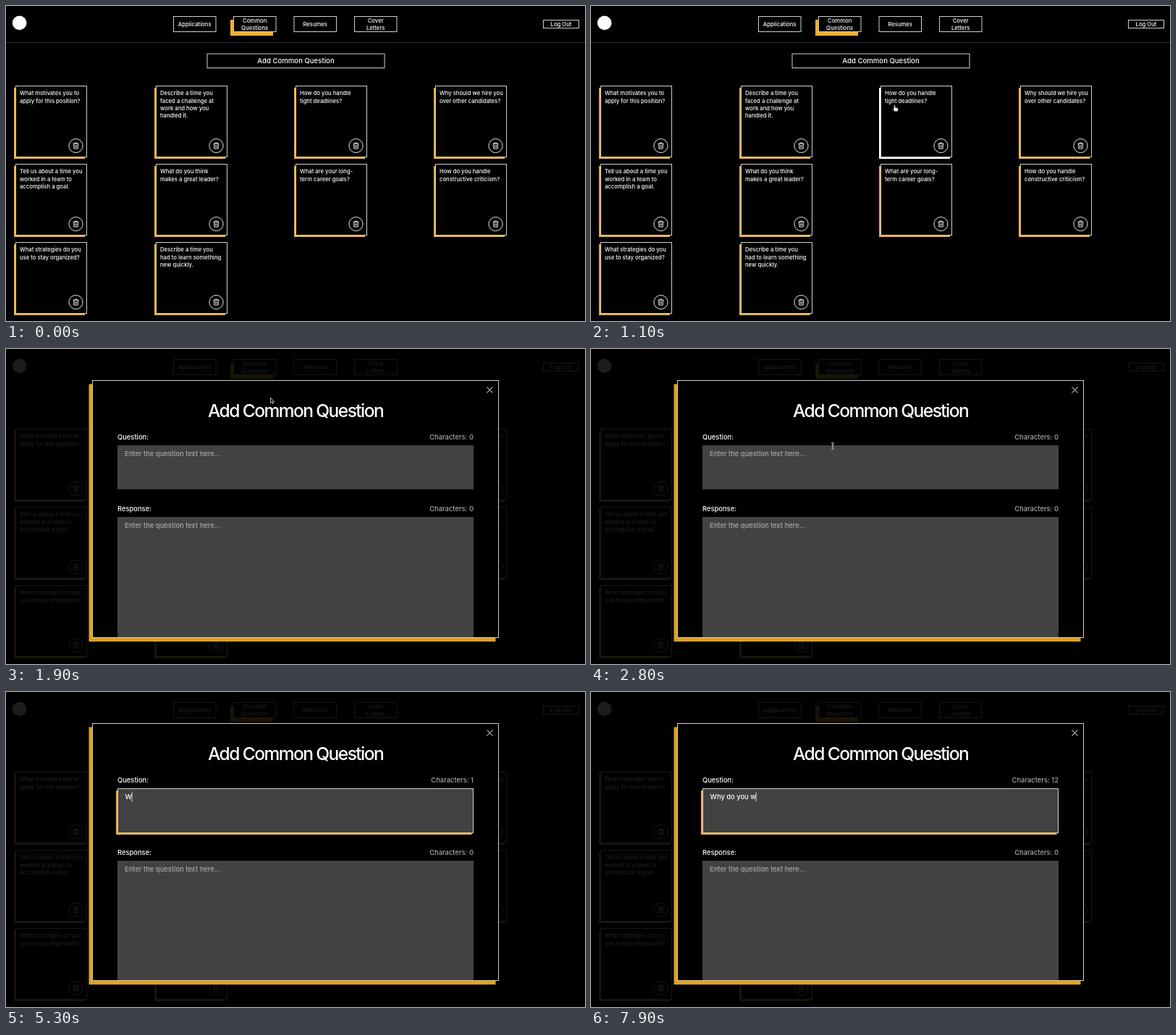
An HTML page that plays this animation: 800 px wide and 435 px high, repeating every 8000 ms.

```html
<!DOCTYPE html>
<html lang="en">
<head>
<meta charset="utf-8">
<title>Common Questions</title>
<style>
  html, body { margin: 0; width: 100%; height: 100%; overflow: hidden; background: #000; }
  svg { display: block; }
  text { font: 500 7.7px Inter, sans-serif; fill: #fff; white-space: pre; }
  .button { font-size: 9.6px; }
  .title { font-size: 24.6px; letter-spacing: -1.6px; }
  .label { font-size: 9.4px; }
  .hint { font-size: 9.4px; fill: #a9a9a9; }
  .mid { text-anchor: middle; }
  .end { text-anchor: end; }
  .line { fill: none; stroke: #fff; }
  .box { fill: #000; stroke: #d0d0d0; }
  .frame { fill: none; stroke: #d0d0d0; }
</style>
</head>
<body>
<svg id="stage" width="800" height="435" viewBox="0 0 800 435"></svg>
<script>
const ORANGE = '#f5ae29', GRAY = '#424242', LOOP = 8000;
const OPEN = 1900, FOCUS = 3600, BLINK = 500;
const CARD = 98, COLUMNS = [13.5, 207.5, 400.5, 593.5];
const BUTTON = { x: 278, y: 66, w: 245, h: 19.5 };

const questions = [
  'What motivates you to|apply for this position?',
  'Describe a time you|faced a challenge at|work and how you|handled it.',
  'How do you handle|tight deadlines?',
  'Why should we hire you|over other candidates?',
  'Tell us about a time you|worked in a team to|accomplish a goal.',
  'What do you think|makes a great leader?',
  'What are your long-|term career goals?',
  'How do you handle|constructive criticism?',
  'What strategies do you|use to stay organized?',
  'Describe a time you|had to learn something|new quickly.'
];
const cards = questions.map((text, i) => ({
  text, x: COLUMNS[i % 4], y: 110.5 + 108 * (i / 4 | 0), w: CARD, h: CARD
}));

const typed = 'Why do you w';
// [time, characters typed so far]
const keys = [[5300, 1], [6300, 2], [6800, 3], [6900, 4], [7100, 5], [7200, 6],
  [7300, 7], [7500, 8], [7600, 10], [7800, 11], [7900, 12]];
// [time, x, y] of the pointer tip
const route = [[100, 462, 424], [600, 442, 275], [1100, 419.5, 137], [1500, 384, 88],
  [1800, 365.5, 68], [2000, 365.5, 67], [2900, 330, 142], [3050, 330, 142], [3300, 322.3, 154]];

const rect = (x, y, w, h, attrs) =>
  `<rect x="${x}" y="${y}" width="${w}" height="${h}" ${attrs}/>`;
const text = (x, y, str, cls = '', id = '') =>
  `<text x="${x}" y="${y}" class="${cls}" id="${id}">${str}</text>`;
const lines = (x, y, str, cls) =>
  str.split('|').map((s, i) => text(x, y + i * 10.35, s, cls)).join('');

function navBox(x, label) {
  const y = label.includes('|') ? 22.8 : 28;
  return rect(x, 14.5, 58.5, 21, 'class="box"') + lines(x + 29.2, y, label, 'mid');
}

function card({ x, y, w, h, text: label }) {
  return rect(x - 2.5, y + 2.5, w, h, 'class="shadow"') +
    rect(x, y, w, h, 'class="box"') + lines(x + 5.5, y + 12.8, label) +
    `<g class="line" stroke-width=".9" transform="translate(${x + 83} ${y + 82.5})">
      <circle r="9.6"/>
      <path d="M-4-2.8H4M-1.5-2.8V-4H1.5V-2.8M-3-2.8L-2.7 4H2.7L3-2.8M-1-1V2.5M1-1V2.5"/></g>`;
}

const page = `
  <path d="M0 50.5H800" stroke="#2c2c2c"/>
  <circle cx="18.6" cy="23.4" r="9.8" fill="#fff"/>
  ${rect(310, 19, 59, 22, `fill="${ORANGE}"`)}
  ${navBox(231.5, 'Applications')}${navBox(314.5, 'Common|Questions')}
  ${navBox(398, 'Resumes')}${navBox(481.5, 'Cover|Letters')}
  ${rect(742.5, 19.5, 49, 11, 'class="box"')}${text(767, 27.8, 'Log Out', 'mid')}
  ${rect(273, 70.5, BUTTON.w, BUTTON.h, 'id="buttonShadow" fill="#fff"')}
  ${rect(BUTTON.x, BUTTON.y, BUTTON.w, BUTTON.h, 'class="box"')}
  ${text(400.5, 79.4, 'Add Common Question', 'button mid')}
  ${cards.map(card).join('')}`;

const placeholder = 'Enter the question text here...';
const modal = `<g id="modal">
  ${rect(0, 0, 800, 435, 'opacity=".89"')}
  ${rect(114.5, 48.5, 562, 355.5, 'fill="#dfa021"')}
  ${rect(119.5, 43.5, 561, 355, '')}
  <path class="line" d="M664.5 52.5l8 8m0-8l-8 8"/>
  ${text(400, 93.6, 'Add Common Question', 'title mid')}
  ${text(154, 125.2, 'Question:', 'label')}${text(646, 125.2, '', 'hint end', 'count')}
  ${rect(154.5, 133.5, 491.5, 61, `id="glow" fill="${ORANGE}"`)}
  ${rect(154, 133, 492, 60.7, `id="field" fill="${GRAY}"`)}
  ${text(164, 147.8, '', 'label', 'entry')}
  <path id="caret" stroke="#fff" stroke-width=".8"/>
  <g id="response">
    ${text(154, 223.8, 'Response:', 'label')}${text(646, 223.8, 'Characters: 0', 'hint end')}
    ${rect(154, 232, 492, 166, `fill="${GRAY}"`)}
    ${text(164, 246.6, placeholder, 'hint')}
  </g>
  ${rect(119.5, 43.5, 561, 355, 'class="frame"')}</g>`;

const beam = 'M-1.8-3.8Q0-3.8 0-2.8V2.8Q0 3.8-1.8 3.8M1.8-3.8Q0-3.8 0-2.8M0 2.8Q0 3.8 1.8 3.8';
const pointers = `<g id="pointer">
  <path id="hand" fill="#fff" stroke="#000" stroke-width=".5"
    d="M-.9.8a.9.9 0 0 1 1.8 0V3.2L4 3.8Q5 4 5 5L4.4 8.8H.2L-2.3 5.6Q-2.5 4.2-.9 5Z"/>
  <path id="arrow" stroke="#fff" stroke-width=".7" d="M0 0V7L1.6 5.6 2.7 8 3.8 7.5 2.8 5.2H5Z"/>
  <g id="ibeam" fill="none"><path stroke="#ddd" stroke-width="1.8" d="${beam}"/>
    <path stroke="#000" stroke-width=".6" d="${beam}"/></g></g>`;

const $ = id => document.getElementById(id);
const show = (id, on) => $(id).setAttribute('visibility', on ? 'inherit' : 'hidden');
const set = (id, attrs) => {
  for (const name in attrs) $(id).setAttribute(name, attrs[name]);
};
$('stage').innerHTML = page + modal + pointers;
const shadows = document.querySelectorAll('.shadow');

function pointerAt(t) {
  const i = route.findIndex(p => p[0] > t);
  if (i < 1) return route[i < 0 ? route.length - 1 : 0].slice(1);
  const [t0, x0, y0] = route[i - 1], [t1, x1, y1] = route[i];
  const k = (t - t0) / (t1 - t0);
  return [x0 + (x1 - x0) * k, y0 + (y1 - y0) * k];
}

function render(t) {
  const open = t >= OPEN, focused = t >= FOCUS;
  const [x, y] = pointerAt(t);
  const visible = t >= route[0][0] && t < keys[0][0];
  const over = b => visible && !open &&
    x >= b.x && x <= b.x + b.w && y >= b.y && y <= b.y + b.h;

  const hovered = cards.findIndex(over), onButton = over(BUTTON);
  shadows.forEach((s, i) => s.setAttribute('fill', i === hovered ? '#fff' : ORANGE));
  show('buttonShadow', onButton);
  show('modal', open);

  const onField = open && y > 133, onLink = hovered >= 0 || onButton;
  show('pointer', visible);
  set('pointer', { transform: `translate(${x} ${y})` });
  show('hand', onLink);
  show('ibeam', onField);
  show('arrow', !onLink && !onField);
  if (!open) return;

  // Focus adds a border, which nudges the layout, and slides the glow out.
  const slide = 2.5 * Math.min(1, Math.max(0, (t - FOCUS + 100) / 200));
  show('glow', focused);
  set('glow', { transform: `translate(${-slide} ${slide})` });
  set('field', focused
    ? { x: 154.5, y: 133.5, width: 491, height: 61, stroke: '#cfcfcf' }
    : { x: 154, y: 133, width: 492, height: 60.7, stroke: 'none' });
  set('response', { transform: `translate(0 ${focused ? 1 : 0})` });

  // The caret shows at once after a key, but only after one blink on focus.
  const [since, count] = keys.filter(k => k[0] <= t).pop() || [FOCUS - BLINK, 0];
  const entry = $('entry');
  entry.textContent = count ? typed.slice(0, count) : placeholder;
  set('entry', {
    class: count ? 'label' : 'hint',
    x: focused ? 164.5 : 164,
    y: focused ? 148.4 : 147.8
  });
  $('count').textContent = 'Characters: ' + count;

  const end = 164.6 + (count ? entry.getComputedTextLength() : 0);
  set('caret', { d: `M${end} 138.5V151.5` });
  show('caret', focused && (t - since) % (2 * BLINK) < BLINK);
}

function frame() {
  render(performance.now() % LOOP);
  requestAnimationFrame(frame);
}
frame();
</script>
</body>
</html>
```
